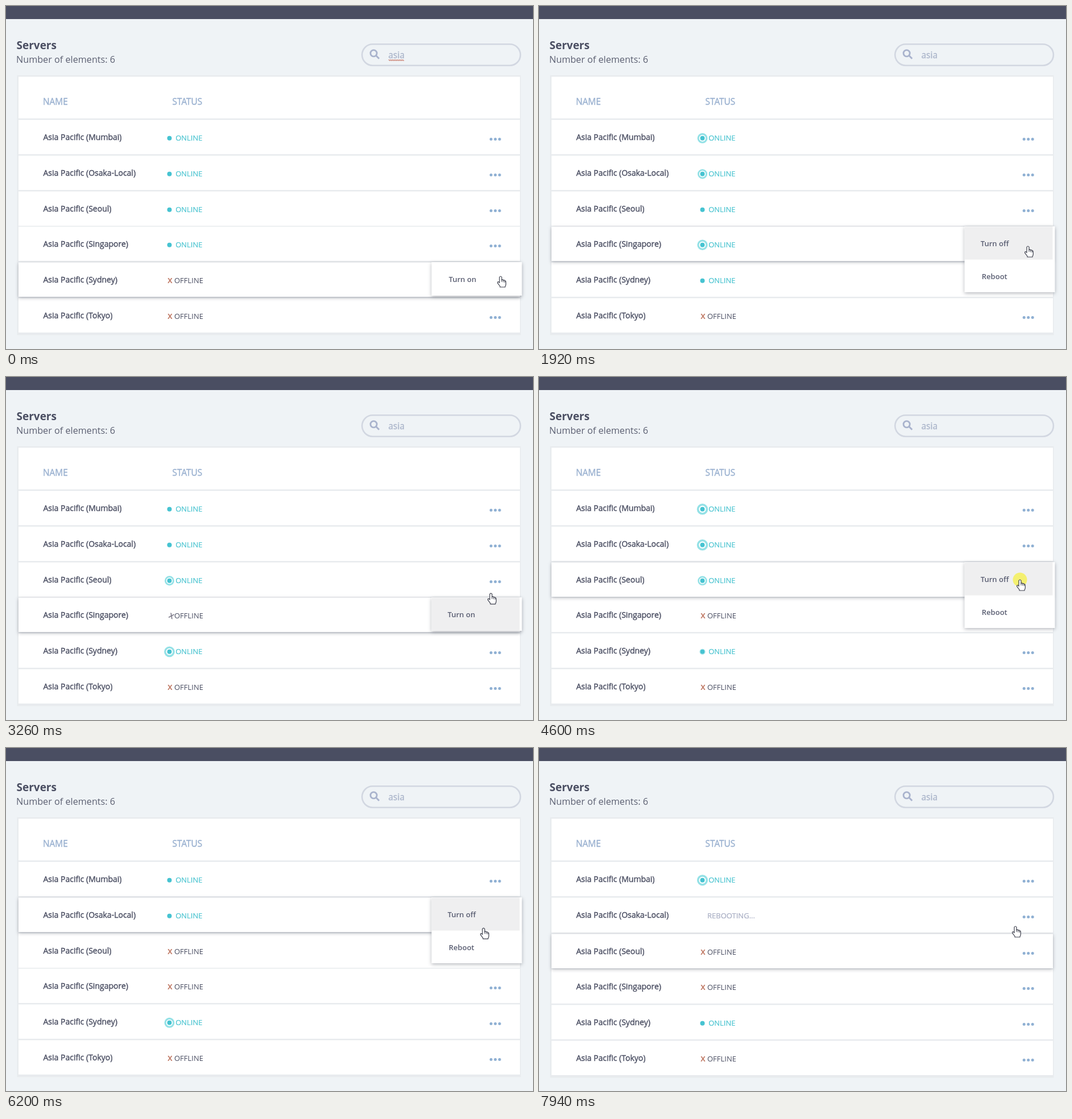
Write an HTML page that moves like this. It is 927 px wide and 604 px high and loops after 8000 ms.

```html
<!DOCTYPE html>
<html lang="en">
<head>
<meta charset="utf-8">
<title>Servers</title>
<style>
  html, body { margin: 0; width: 100%; height: 100%; overflow: hidden; background: #eff3f6; }
  svg { display: block; width: 100%; height: 100%; font-family: "Open Sans", sans-serif; }
  .title { font-size: 19px; font-weight: 700; fill: #4a4e62; }
  .count { font-size: 16.2px; fill: #5b5f71; }
  .query { font-size: 15.5px; fill: #a9b3c9; stroke: #a9b3c9; stroke-width: .3px; }
  .head { font-size: 15.4px; fill: #9ab1d0; stroke: #9ab1d0; stroke-width: .4px; }
  .name { font-size: 14px; fill: #4a4e62; stroke: #4a4e62; stroke-width: .4px; }
  .status { font-size: 13px; }
  .online { fill: #4ac4d0; stroke: #4ac4d0; stroke-width: .2px; }
  .offline { fill: #4a4e62; }
  .reboot { fill: #a6acc2; stroke: #a6acc2; stroke-width: .2px; }
  .cross { font-size: 12.6px; font-weight: 700; text-anchor: middle; }
  .item { font-size: 13px; font-weight: 600; fill: #5a5e72; }
  .lifted { filter: drop-shadow(0 2px 3px rgba(50, 55, 70, .32)); }
  .menu { filter: drop-shadow(0 2px 3px rgba(50, 55, 70, .36)); }
</style>
</head>
<body>
<svg viewBox="0 0 927 604" preserveAspectRatio="none">
  <rect width="927" height="604" fill="#eff3f6"/>
  <rect width="927" height="23" fill="#4a4e62"/>
  <text class="title" x="18.5" y="76">Servers</text>
  <text class="count" x="18" y="100">Number of elements: 6</text>

  <rect x="626.3" y="67.3" width="278.6" height="37.4" rx="18.7" fill="#eff3f6" stroke="#d2d7e1" stroke-width="2.6"/>
  <g fill="none" stroke="#a9b3cd" stroke-width="2.8">
    <circle cx="646.7" cy="83.2" r="5.6"/>
    <path d="M650.8 87.3L656.3 92.8"/>
  </g>
  <text class="query" x="672.5" y="92">asia</text>
  <path id="squiggle" fill="none" stroke="#cf8d80" stroke-width="1.2"/>

  <rect id="card" x="19.5" y="122" width="886" fill="#e8ebee"/>
  <rect x="22" y="124.5" width="882" height="73.5" fill="#fff"/>
  <text class="head" x="65" y="173.5">NAME</text>
  <text class="head" x="292.5" y="173.5">STATUS</text>
  <g id="rows"></g>

  <g id="menu">
    <rect id="panel" class="menu" x="748.5" width="159" fill="#fff"/>
    <rect id="hover" x="749" width="154.5" height="58" fill="#efeff0"/>
    <text id="item0" class="item"></text>
    <text id="item1" class="item">Reboot</text>
  </g>

  <g id="pointer">
    <circle id="click" r="12.5" fill="#f4ef62" opacity=".9"/>
    <g id="hand" fill="#fff" stroke="#3c3f4c" stroke-width="1.2" stroke-linejoin="round">
      <path d="M-2 1.5Q0-1.5 2 1.5V6.5Q4 5 5 7Q7 6 7.4 8Q9.3 7.6 9.3 10V14Q9.3 16 8 18V19H-1V17.5L-5.3 11.8Q-5.8 8.8-3.4 9.8L-2 11.3Z"/>
      <path d="M2 6V10M4.8 7V10.5M7.4 8V11" fill="none" stroke-width="1"/>
    </g>
    <path id="arrow" d="M0 0V14.5L3.4 11.4L5.6 16.2L7.8 15.2L5.7 10.5H10Z" fill="#fff" stroke="#3c3f4c" stroke-width="1.2"/>
  </g>
</svg>

<script>
const LOOP = 8000;
const $ = id => document.getElementById(id);
const show = (el, on) => el.setAttribute('display', on ? 'inline' : 'none');
const set = (el, attrs) => { for (const k in attrs) el.setAttribute(k, attrs[k]); };

function add(parent, tag, attrs, text) {
  const el = document.createElementNS('http://www.w3.org/2000/svg', tag);
  set(el, attrs);
  if (text) el.textContent = text;
  return parent.appendChild(el);
}

// Status changes are [time, state]; pulse is [period, time of rest].
const servers = [
  { city: 'Mumbai', pulse: [3100, 0], log: [[0, 'online']] },
  { city: 'Osaka-Local', pulse: [3100, -100], log: [[0, 'online'], [7120, 'reboot']] },
  { city: 'Seoul', pulse: [2000, -60], log: [[0, 'online'], [5050, 'offline']] },
  { city: 'Singapore', pulse: [3100, 50], log: [[0, 'online'], [2800, 'offline']] },
  { city: 'Sydney', pulse: [3050, 2000], log: [[0, 'offline'], [850, 'online']] },
  { city: 'Tokyo', pulse: [3100, 0], log: [[0, 'offline']] }
];

// [time, row]
const lifts = [[0, 4], [1330, 3], [3880, 2], [5400, 1], [7600, 2]];
// [time, row, first item, hovered item]
const menus = [
  [0, 4, 'Turn on', -1], [850, 4, 'Turn off', 0], [1330, 3, 'Turn off', 0],
  [2800, 3, 'Turn on', 0], [3340, 2, 'Turn off', 0], [5050, 2, 'Turn on', 0],
  [5400, 1, 'Turn off', 0], [6380, 1, 'Turn off', 1], [7120, -1]
];
// [time, x, y]
const path = [
  [0, 870, 476], [880, 870, 476], [1230, 864, 444.5], [1400, 860, 423], [3060, 860, 423],
  [3260, 853, 381], [3400, 846, 357], [5310, 846, 357], [5520, 841, 311], [6050, 840, 313],
  [6200, 840, 317], [6420, 840, 336], [7510, 840, 336], [7900, 838, 314], [LOOP, 838, 314]
];
const clicks = [[320, 560], [2080, 2300], [4540, 4720], [6570, 6790]];
// Spans in which the picture stands still.
const stalls = [
  [620, 790], [1400, 1640], [2390, 2460], [2520, 2700], [3120, 3260], [3410, 3840], [4330, 4480],
  [5220, 5310], [5540, 5680], [6460, 6570], [6640, 6790], [6920, 7090], [7350, 7510]
];

const latest = (list, t) => list.filter(e => e[0] <= t).pop();
const inside = (list, t) => list.find(([a, b]) => t >= a && t < b);
const clamp = v => Math.max(0, Math.min(1, v));
const rowTop = (i, shifted) => Math.round(199 + 62.8 * i) + (shifted && i > 1 ? 1 : 0);

let wave = 'M673 95.5';
for (let x = 0; x < 27; x += 3) wave += 'q.75-2 1.5 0t1.5 0';
$('squiggle').setAttribute('d', wave);

for (const s of servers) {
  const g = s.group = add($('rows'), 'g', {});
  s.back = add(g, 'rect', { x: 22, y: 1.5, width: 882, height: 60.5, fill: '#fff' });
  add(g, 'text', { class: 'name', x: 65.5, y: 37 }, `Asia Pacific (${s.city})`);
  s.online = add(g, 'text', { class: 'status online', x: 298.2, y: 37.7 }, 'ONLINE');
  s.offline = add(g, 'text', { class: 'status offline', x: 296, y: 37.7 }, 'OFFLINE');
  s.reboot = add(g, 'text', { class: 'status reboot', x: 296, y: 38.2 }, 'REBOOTING...');
  s.beacon = add(g, 'g', { transform: 'translate(287.5 33.8)' });
  s.ring = add(s.beacon, 'circle', { fill: 'none', stroke: '#94e1e6' });
  add(s.beacon, 'circle', { r: 4, fill: '#46c3d1' });
  s.cross = add(g, 'text', { class: 'cross', y: 4.5 }, 'X');
  for (let k = 0; k < 3; k++) add(g, 'circle', { cx: 853.2 + 7.5 * k, cy: 35.5, r: 2.5, fill: '#8fb0d3' });
}

function drawServer(s, i, t, shifted, lifted) {
  const [since, state] = latest(s.log, t);
  const age = since ? t - since : 9999;
  s.group.setAttribute('transform', `translate(0 ${rowTop(i, shifted)})`);
  s.back.setAttribute('height', shifted && i === 1 ? 61.5 : 60.5);
  s.back.setAttribute('class', lifted ? 'lifted' : '');
  for (const name of ['online', 'offline', 'reboot']) show(s[name], state === name);

  show(s.beacon, state === 'online' && age > 550);
  const [period, rest] = s.pulse;
  const swell = (1 - Math.cos(2 * Math.PI * (t - rest) / period)) / 2;
  set(s.ring, { r: 4 + 4 * swell, 'stroke-width': 3.6 * swell });

  const turn = clamp((age - 250) / 370);
  show(s.cross, state === 'offline' && turn > 0);
  set(s.cross, {
    transform: `translate(${288.5 + 6 * (1 - turn)} 33.7) rotate(${60 * (1 - turn)})`,
    fill: turn < .8 ? '#7f7d8b' : '#c07a66',
    opacity: clamp(turn * 2)
  });
}

function drawMenu(t) {
  const [, row, label, hovered] = latest(menus, t);
  show($('menu'), row >= 0);
  if (row < 0) return;
  const top = rowTop(row) + 1;
  const pair = label === 'Turn off';
  set($('panel'), { y: top, height: pair ? 116 : 59 });
  show($('hover'), hovered >= 0);
  $('hover').setAttribute('y', top + .5 + 57.5 * Math.max(hovered, 0));
  $('item0').textContent = label;
  set($('item0'), { x: hovered === 0 ? 776.8 : 778.8, y: top + 34.5 });
  set($('item1'), { x: hovered === 1 ? 776.8 : 778.8, y: top + 92.5 });
  show($('item1'), pair);
}

function drawPointer(t) {
  const n = path.findIndex(p => p[0] > t);
  const [t0, x0, y0] = path[n - 1], [t1, x1, y1] = path[n];
  const f = (t - t0) / (t1 - t0);
  $('pointer').setAttribute('transform', `translate(${x0 + (x1 - x0) * f} ${y0 + (y1 - y0) * f})`);
  const arrow = t > 1180 && t < 1330;
  show($('arrow'), arrow);
  show($('hand'), !arrow);
  show($('click'), inside(clicks, t));
}

let lastLift = -1;
function draw(time) {
  let t = time % LOOP;
  const stall = inside(stalls, t);
  if (stall) t = stall[0];

  const shifted = t >= 7120;
  const lift = latest(lifts, t)[1];
  if (lift !== lastLift) $('rows').appendChild(servers[lift].group);
  lastLift = lift;
  servers.forEach((s, i) => drawServer(s, i, t, shifted, i === lift));
  $('card').setAttribute('height', shifted ? 458.5 : 457.5);
  show($('squiggle'), t < 400);
  drawMenu(t);
  drawPointer(t);
}

const start = performance.now();
function tick() {
  draw(performance.now() - start);
  requestAnimationFrame(tick);
}
tick();
</script>
</body>
</html>
```
